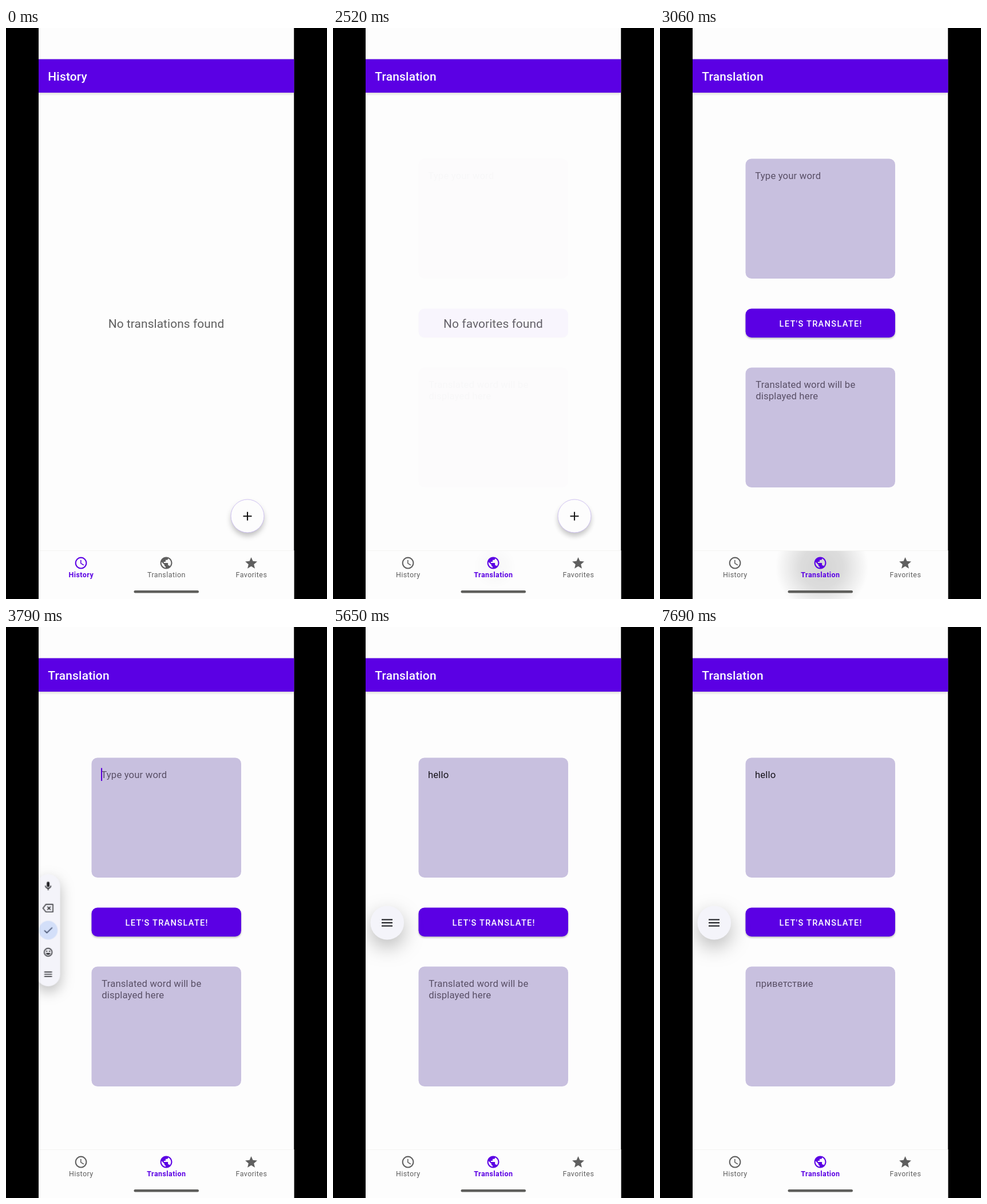
Animation of 561 by 998 pixels, one loop 8000 ms. Source, as an HTML page:

```html
<!DOCTYPE html>
<html lang="en">
<head>
<meta charset="utf-8">
<title>Translator app</title>
<style>
:root { --accent: #5b00e4; --grey: #5f5f5f; --paper: #fdfdfd; }
html, body { margin: 0; width: 100%; height: 100%; overflow: hidden; background: #000; }
svg { display: block; width: 100%; height: 100%; }
text { font-family: Roboto, sans-serif; }

/* Every moving part runs on the same eight-second clock. */
.soft, .hard { animation: 8s linear infinite both; }
.hard { animation-timing-function: step-end; }

.title { font-size: 20.9px; font-weight: 500; letter-spacing: .2px; fill: #fff; }
.message { font-size: 20.9px; letter-spacing: .08px; fill: var(--grey); text-anchor: middle; }
.field { font-size: 16.7px; letter-spacing: .15px; fill: #594f66; }
.action { font-size: 14.6px; font-weight: 500; letter-spacing: 1.3px; fill: #fff; text-anchor: middle; }
.tab { font-size: 12.5px; letter-spacing: .42px; text-anchor: middle; fill: currentColor; color: var(--grey); }
.box { fill: #c8c0df; }
.fab { filter: drop-shadow(0 6px 5px rgba(0,0,0,.24)); }
.button { fill: var(--accent); filter: drop-shadow(0 2px 1.5px rgba(0,0,0,.25)); }
.raised { fill: var(--accent); filter: drop-shadow(0 6px 5px rgba(0,0,0,.3)); }
.bar { fill: var(--accent); filter: drop-shadow(0 2px 2px rgba(0,0,0,.16)); }
.line { fill: none; stroke: #17181c; stroke-width: 2; }

/* Titles and tabs switch at once, pages cross-fade. */
.title-history { animation-name: title-history; }
.title-favorites { animation-name: title-favorites; }
.title-translation { animation-name: title-translation; }
@keyframes title-history { 0% { opacity: 1 } .7%, to { opacity: 0 } }
@keyframes title-favorites { 0% { opacity: 0 } .7% { opacity: 1 } 31.44%, to { opacity: 0 } }
@keyframes title-translation { 0% { opacity: 0 } 31.44%, to { opacity: 1 } }

.tab-history { animation-name: tab-history; }
.tab-favorites { animation-name: tab-favorites; }
.tab-translation { animation-name: tab-translation; }
@keyframes tab-history {
  0% { color: var(--accent); font-weight: 700 }
  .7%, to { color: var(--grey); font-weight: 400 }
}
@keyframes tab-favorites {
  0% { color: var(--grey); font-weight: 400 }
  .7% { color: var(--accent); font-weight: 700 }
  31.44%, to { color: var(--grey); font-weight: 400 }
}
@keyframes tab-translation {
  0% { color: var(--grey); font-weight: 400 }
  31.44%, to { color: var(--accent); font-weight: 700 }
}

.page-history { animation-name: page-history; }
.page-favorites { animation-name: page-favorites; }
.page-translation { animation-name: page-translation; }
@keyframes page-history { 0%, .69% { opacity: 1 } 3%, to { opacity: 0 } }
@keyframes page-favorites { 0%, .69% { opacity: 0 } 3%, 31.44% { opacity: 1 } 33.75%, to { opacity: 0 } }
@keyframes page-translation { 0%, 31.44% { opacity: 0 } 33.75%, to { opacity: 1 } }

.ripple { animation-name: ripple; }
@keyframes ripple {
  0% { r: 38px; opacity: 0 }
  .9% { r: 60px; opacity: .95 }
  1.56% { r: 72px; opacity: 1 }
  3.6% { r: 82px; opacity: 1 }
  5.2% { r: 82px; opacity: .9 }
  9.9%, to { r: 82px; opacity: 0 }
}

/* Typing */
.hint { animation-name: hint; }
.caret { animation-name: caret; }
.typing { animation-name: typing; }
.result { animation-name: result; }
@keyframes hint { 0% { opacity: 1 } 52.75%, to { opacity: 0 } }
@keyframes typing {
  0% { transform: translateX(0) }
  52.75% { transform: translateX(9.3px) }
  56.3% { transform: translateX(18.4px) }
  58.6% { transform: translateX(22.7px) }
  61.6% { transform: translateX(26.9px) }
  64.6%, to { transform: translateX(36.8px) }
}
@keyframes caret {
  0% { opacity: 0 } 45% { opacity: 1 } 51.25% { opacity: 0 } 52.75% { opacity: 1 }
  70.4% { opacity: 0 } 76.9% { opacity: 1 } 83.2% { opacity: 0 }
  89.3% { opacity: 1 } 95.9%, to { opacity: 0 }
}
@keyframes result { 0% { opacity: 0 } 88.6%, to { opacity: 1 } }
.waiting { animation-name: waiting; }
@keyframes waiting { 0% { opacity: 1 } 88.6%, to { opacity: 0 } }

.press { animation-name: press; }
@keyframes press { 0%, 74.25% { opacity: 0 } 75.6%, 76.4% { opacity: 1 } 78.6%, to { opacity: 0 } }

/* Floating toolbar: slides in from the edge, then folds into a disc. */
.palette { animation-name: slide, appear; transform-origin: 94.5px 517px; filter: drop-shadow(0 13px 17px rgba(0,0,0,.27)); }
.pill { fill: #f4f4fa; animation-name: fold; }
.tools { animation-name: tools; }
.menu { animation-name: menu; }
@keyframes slide {
  0%, 44.2% { transform: translate(-42px, 26px) scale(.42); animation-timing-function: ease-in-out }
  50.55%, to { transform: none }
}
@keyframes appear { 0%, 44% { opacity: 0 } 45.6%, to { opacity: 1 } }
@keyframes fold {
  0%, 54.6% { y: 379.5px; height: 275px; animation-timing-function: ease-in-out }
  59.8%, to { y: 487.5px; height: 59px }
}
@keyframes tools { 0%, 54.4% { opacity: 1 } 57%, to { opacity: 0 } }
@keyframes menu {
  0%, 54.6% { transform: translateY(108px); animation-timing-function: ease-in-out }
  59.8%, to { transform: none }
}
</style>
</head>
<body>
<svg viewBox="0 0 561 998">
  <defs>
    <clipPath id="screen"><rect x="57" width="446.5" height="998"/></clipPath>
    <clipPath id="tabs"><rect x="57" y="914" width="446.5" height="84"/></clipPath>
    <clipPath id="typed"><rect class="hard typing" x="66" y="235" width="100" height="50"/></clipPath>
    <radialGradient id="glow">
      <stop offset="0" stop-opacity=".27"/>
      <stop offset=".45" stop-opacity=".22"/>
      <stop offset="1" stop-opacity="0"/>
    </radialGradient>
    <g id="fab">
      <circle class="fab" cx="422" cy="853" r="29" fill="#fdfdfd"/>
      <circle cx="422" cy="853" r="29" fill="none" stroke="#c5b4f0" stroke-width=".8"/>
      <path d="M414.5 853.2h15M422 845.7v15" stroke="#111" stroke-width="2.1"/>
    </g>
  </defs>

  <rect width="561" height="998"/>
  <g clip-path="url(#screen)">
    <rect x="57" width="446.5" height="998" fill="#fdfdfd"/>

    <g class="soft page-history">
      <text class="message" x="280" y="524">No translations found</text>
      <use href="#fab"/>
    </g>
    <g class="soft page-favorites">
      <text class="message" x="280" y="524">No favorites found</text>
      <use href="#fab"/>
    </g>
    <g class="soft page-translation">
      <rect class="box" x="149.5" y="228.5" width="261.5" height="209.5" rx="10.5"/>
      <text class="field hard hint" x="166.3" y="264">Type your word</text>
      <g clip-path="url(#typed)"><text class="field" x="166" y="264" style="fill:#17141c">hello</text></g>
      <g class="hard typing"><rect class="hard caret" x="166" y="246.5" width="2.1" height="22.5" fill="#5b00d8"/></g>

      <rect class="button" x="149.5" y="490.5" width="261.5" height="50.5" rx="10.5"/>
      <g class="soft press">
        <rect class="raised" x="149.5" y="490.5" width="261.5" height="50.5" rx="10.5"/>
        <rect x="149.5" y="490.5" width="261.5" height="50.5" rx="10.5" fill="#fff" opacity=".16"/>
      </g>
      <text class="action" x="281.2" y="521.5">LET'S TRANSLATE!</text>

      <rect class="box" x="149.5" y="593.5" width="261.5" height="209.5" rx="10.5"/>
      <g class="hard waiting">
        <text class="field" x="167.2" y="629">Translated word will be</text>
        <text class="field" x="167.2" y="649">displayed here</text>
      </g>
      <text class="field hard result" x="167" y="629">приветствие</text>
    </g>

    <rect class="bar" x="57" y="54.5" width="446.5" height="58.5"/>
    <text class="title hard title-history" x="73.3" y="92">History</text>
    <text class="title hard title-favorites" x="73.3" y="92">Favorites</text>
    <text class="title hard title-translation" x="73.3" y="92">Translation</text>

    <rect x="57" y="913" width="446.5" height="1" fill="#f4f4f2"/>
    <rect x="57" y="914" width="446.5" height="84" fill="#fdfdfd"/>
    <g clip-path="url(#tabs)" fill="url(#glow)">
      <circle class="soft ripple" style="animation-delay:55ms" cx="429" cy="942" r="40"/>
      <circle class="soft ripple" style="animation-delay:2515ms" cx="283" cy="942" r="40"/>
    </g>
    <g class="tab hard tab-history">
      <g transform="translate(118.5 922.5) scale(1.045)">
        <circle cx="12" cy="12" r="9" fill="none" stroke="currentColor" stroke-width="2"/>
        <path d="M12.5 7H11v6l5.25 3.15.75-1.23-4.5-2.67z"/>
      </g>
      <text x="131.3" y="960">History</text>
    </g>
    <g class="tab hard tab-translation">
      <path transform="translate(267.5 922.5) scale(1.045)" d="M12 2C6.48 2 2 6.48 2 12s4.48 10 10 10 10-4.48 10-10S17.52 2 12 2zm-1 17.93c-3.95-.49-7-3.85-7-7.93 0-.62.08-1.21.21-1.79L9 15v1c0 1.1.9 2 2 2v1.93zm6.9-2.54c-.26-.81-1-1.39-1.9-1.39h-1v-3c0-.55-.45-1-1-1H8v-2h2c.55 0 1-.45 1-1V7h2c1.1 0 2-.9 2-2v-.41c2.93 1.19 5 4.06 5 7.41 0 2.08-.8 3.97-2.1 5.39z"/>
      <text x="280.4" y="960">Translation</text>
    </g>
    <g class="tab hard tab-favorites">
      <path transform="translate(416 922.8) scale(1.045)" d="M12 17.27L18.18 21l-1.64-7.03L22 9.24l-7.19-.61L12 2 9.19 8.63 2 9.24l5.46 4.73L5.82 21z"/>
      <text x="428.9" y="960">Favorites</text>
    </g>
    <rect x="223.5" y="983" width="113.5" height="4.5" rx="2.2" fill="#5f5f5c"/>

    <g class="soft palette">
      <rect class="soft pill" x="65.5" y="379.5" width="58.5" height="275" rx="29.2"/>
      <g class="soft tools">
        <path transform="translate(81.3 395.5) scale(1.1)" fill="#17181c" d="M12 14c1.66 0 3-1.34 3-3V5c0-1.66-1.34-3-3-3S9 3.34 9 5v6c0 1.66 1.34 3 3 3zm5-3c0 2.76-2.24 5-5 5s-5-2.24-5-5H5c0 3.53 2.61 6.43 6 6.92V21h2v-3.08c3.39-.49 6-3.39 6-6.92h-2z"/>
        <path class="line" stroke-width="2.2" stroke-linejoin="round" d="M89 453.5h17.2v18.5H89L81.8 462.8zM92.5 458.8l8 8m0-8l-8 8"/>
        <circle cx="94.7" cy="517" r="23" fill="#d3dff9"/>
        <path class="line" style="stroke:#26324f" d="M85.3 517.5l6 6L104.500 510.500"/>
        <circle class="line" cx="94.5" cy="571" r="9.6"/>
        <circle cx="91" cy="568.5" r="1.7" fill="#17181c"/>
        <circle cx="98" cy="568.5" r="1.7" fill="#17181c"/>
        <path fill="#17181c" d="M88.700 573h11.600a6.200 6.200 0 0 1-11.600 0z"/>
      </g>
      <path class="line soft menu" d="M85 511.600h19M85 517h19M85 522.400h19"/>
    </g>
  </g>
</svg>
</body>
</html>
```
